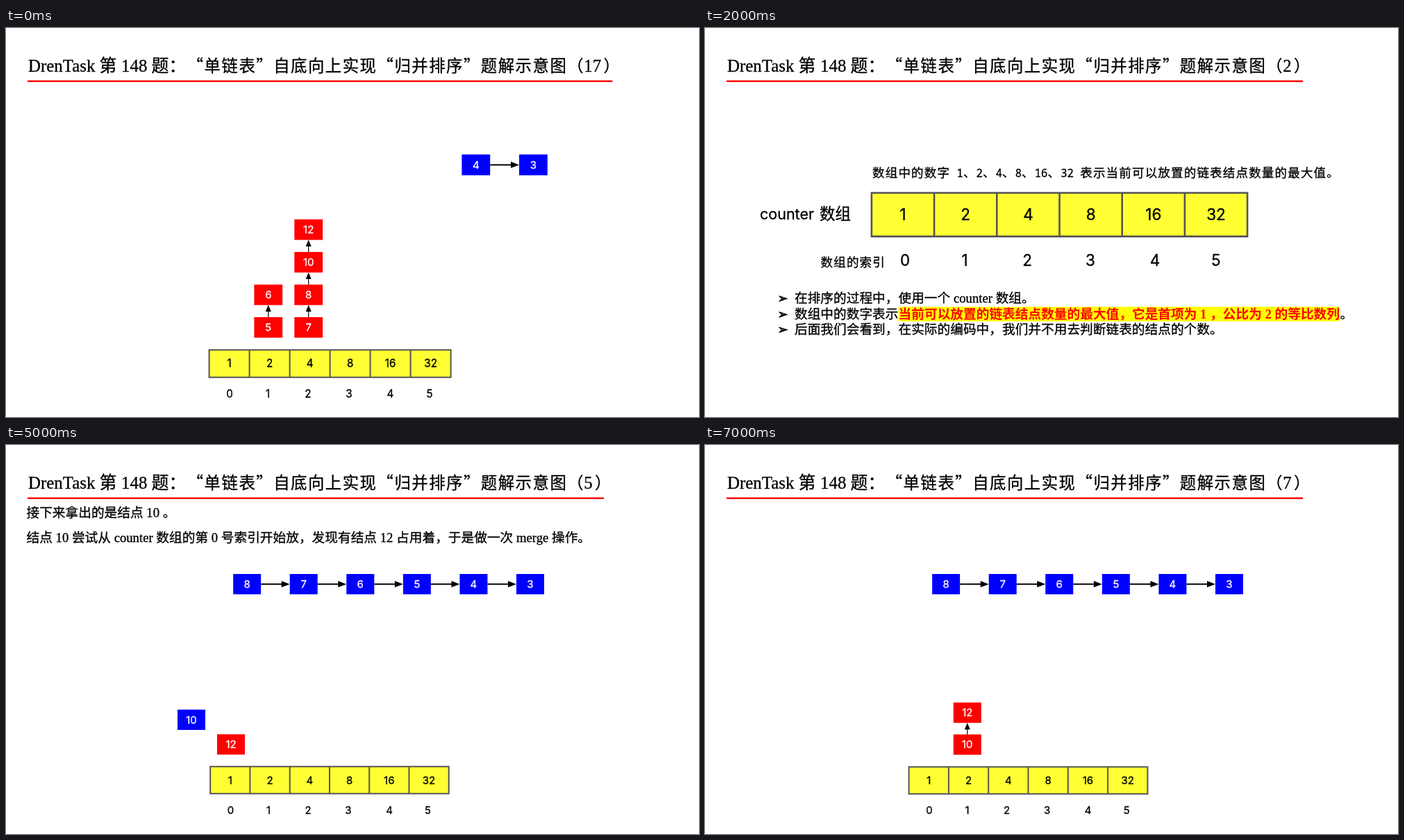
Recreate the animation shown at these times as an HTML page. Size 998 px wide and 561 px high, loop 8000 ms.

```html
<!DOCTYPE html>
<html lang="zh-CN">
<head>
<meta charset="utf-8">
<title>归并排序</title>
<style>
html, body { margin: 0; width: 100%; height: 100%; overflow: hidden; background: #fff; }
svg { display: block; width: 998px; height: 561px; }
text {
  white-space: pre;
  text-spacing-trim: space-all;
  text-autospace: no-autospace;
  font-family: "Liberation Serif", "Noto Sans CJK SC", "Noto Sans CJK JP", serif;
  stroke-width: .3px;
}
.cjk, .kai { font-family: "Noto Sans CJK SC", "Noto Sans CJK JP", sans-serif; }
.kai { letter-spacing: .064em; }
.mono { font-family: "Noto Sans Mono", monospace; letter-spacing: 0; }
.num { font-family: Inter, "Noto Sans CJK SC", sans-serif; }
.mid { text-anchor: middle; }
.heavy { font-weight: 500; }
.mark { font-weight: 700; stroke-width: 0; }
.bullet { font-family: "DejaVu Sans", sans-serif; stroke-width: .7px; }
.slide { visibility: hidden; animation: show 8s step-end infinite; }
@keyframes show {
  0% { visibility: visible; }
  12.5%, 100% { visibility: hidden; }
}
</style>
</head>
<body>
<svg id="stage" viewBox="0 0 998 561" xmlns="http://www.w3.org/2000/svg"></svg>
<script>
const BLUE = '#00f', RED = '#f00', BODY = 18.7, HEAD = 24.9;
const list = [12, 10, 8, 7, 6, 5, 4, 3];

const text = (x, y, size, str, cls = '', fill = '#000') =>
  `<text x="${x}" y="${y}" font-size="${size}" class="${cls}" fill="${fill}" stroke="${fill}">${str}</text>`;
const rect = (x, y, w, h, fill) =>
  `<rect x="${x}" y="${y}" width="${w}" height="${h}" fill="${fill}"/>`;
const body = (x, y, str) => text(x, y, BODY, str);
// slightly smaller glyphs on the full character pitch
const kai = (x, y, size, str) => text(x + size * .03, y, size * .94, str, 'kai');
const mono = str => `<tspan class="mono" font-size="15.6">${str}</tspan>`;

function title(n) {
  const end = 832.3 + String(n).length * HEAD / 2;
  return text(32, 63, HEAD, 'DrenTask') +
    text(134.5, 63, HEAD, '第', 'cjk heavy') +
    text(166, 63, HEAD, '148') +
    text(209.5, 63, HEAD, '题：', 'cjk heavy') +
    kai(260, 62.5, HEAD, '“单链表”自底向上实现“归并排序”题解示意图（') +
    text(832.3, 63, HEAD, n) +
    kai(end + 2.5, 62.5, HEAD, '）') +
    rect(31, 75.5, end - 14.8, 2.5, RED);
}

function node(x, y, val, fill, w = 40, h = 29.3, size = 15) {
  return rect(x, y, w, h, fill) +
    text(x + w / 2, y + h / 2 + size * .36, size, val, 'num mid', '#fff');
}

// arrow pointing right, or up when turned
function arrow(x, y, len, head, half, weight, turn = 0) {
  return `<g transform="translate(${x} ${y}) rotate(${turn})">` +
    `<path d="M0 0H${len - head + 1}" stroke="#000" stroke-width="${weight}"/>` +
    `<path d="M${len - head} ${-half}L${len} 0L${len - head} ${half}Z"/></g>`;
}

function chain(x, y, step, vals, o = {}) {
  const { w = 40, h = 29.3, size = 15, head = 12, half = 4.6, weight = 2, first = BLUE } = o;
  return vals.map((v, i) => {
    const left = x + i * step;
    return node(left, y, v, i ? BLUE : first, w, h, size) +
      (i < vals.length - 1 ? arrow(left + w, y + h / 2, step - w, head, half, weight) : '');
  }).join('');
}

// vals run from the bottom upwards
function stack(x, y, step, vals, w = 40, h = 29.3) {
  return vals.map((v, i) => {
    const top = y - i * step;
    return node(x, top, v, RED, w, h) +
      (i < vals.length - 1 ? arrow(x + w / 2, top, step - h, 9.5, 4, 1.2, -90) : '');
  }).join('');
}

function counter(x, y, step, h, size, labels, labelY, weight = 2) {
  let out = '', lines = '';
  for (let i = 0; i < 6; i++) {
    out += text(x + step * (i + .5), y + h / 2 + size * .36, size, 2 ** i, 'num mid') +
      text(labels[i], labelY, size, i, 'num mid');
    if (i) lines += `M${x + step * i} ${y}v${h}`;
  }
  return `<path d="M${x} ${y}h${step * 6}v${h}h${-step * 6}z${lines}" fill="#ff3" stroke="#555" stroke-width="${weight}"/>` + out;
}

const marked = (x, y, w, str) =>
  rect(x, y - 16.5, w, 21, '#ff0') + text(x, y, BODY, str, 'mark', RED);
const point = (y, str) => text(104.5, y, 18, '➢', 'bullet') + body(129, y, str);

const small = [323.5, 378, 435, 493, 552, 607.5];
const rowA = counter(294.2, 463.7, 57.25, 39, 15, small, 531.5);
const rowB = counter(293.6, 464.2, 57.3, 39, 15, small.map(x => x - .4), 532);
const rest = n => chain(164 + n * 81.57, 186, 81.57, list.slice(n));

const slides = [
  title(17) +
    chain(656.4, 182.4, 82.6, [4, 3], { w: 40.8, h: 30 }) +
    stack(357.4, 417, 47, [5, 6], 40.8, 29.6) +
    stack(415.3, 417, 47, [7, 8, 10, 12], 40.8, 29.6) +
    counter(292.6, 464.2, 58, 39.6, 15.2, [322, 377, 435, 494, 553.5, 610], 533),

  title(1) +
    text(107.5, 206, HEAD, '假设待排序的链表为：', 'cjk heavy') +
    text(357, 206, HEAD, list.join(' -&gt; ') + ' -&gt; NULL 。') +
    chain(44.2, 239.3, 120.57, list, { w: 59, h: 42, size: 22, head: 17.5, half: 6.6, weight: 2.5 }),

  title(2) +
    kai(240.5, 214.5, BODY, '数组中的数字' + mono(' ') +
      [1, 2, 4, 8, 16].map(v => mono(v) + '、').join('') + mono('32 ') +
      '表示当前可以放置的链表结点数量的最大值。') +
    text(79, 276, 21.5, 'counter', 'num') +
    text(165, 276, 22.5, '数组', 'cjk') +
    counter(239.9, 237.8, 90.2, 62.8, 22.5, [288, 374, 464, 555, 648, 736], 343, 2.6) +
    kai(166, 343.5, BODY, '数组的索引') +
    point(396, '在排序的过程中，使用一个 counter 数组。') +
    point(418.5, '数组中的数字表示') +
    marked(278.6, 418.5, 636, '当前可以放置的链表结点数量的最大值，它是首项为 1 ，公比为 2 的等比数列') +
    body(914.6, 418.5, '。') +
    point(441, '后面我们会看到，在实际的编码中，我们并不用去判断链表的结点的个数。'),

  title(3) +
    body(40.5, 109.3, '我们将链表的结点') +
    marked(190.3, 109.3, 168.3, '按顺序逐个脱离链表') +
    body(358.6, 109.3, '，放在 counter 数组合适的位置上。') +
    body(40.5, 139, '首先取出链表的第 1 个结点，放在 counter 数组的索引为 0 的位置上。当前拿出的是结点 12，') +
    body(40.5, 161.5, 'counter 数组的 0 号位置为空，直接放上去就好了。') +
    chain(164, 186, 81.57, list, { first: RED }) + rowA,

  title(4) + rest(1) + node(304, 417.2, 12, RED) + rowA,

  title(5) +
    body(29.5, 103.7, '接下来拿出的是结点 10 。') +
    body(29.5, 140, '结点 10 尝试从 counter 数组的第 0 号索引开始放，发现有结点 12 占用着，于是做一次 merge 操作。') +
    rest(2) + node(247, 381.6, 10, BLUE) + node(304, 417.2, 12, RED) + rowA,

  title(6) +
    body(29.5, 103.7, '结点 10 和结点 12 merge 以后得到的链表 10 -&gt; 12 ，结点的个数为 2 ，超过了 counter 数组的 0 号位置的最大值 1 ，') +
    body(29.5, 140, '因此把它放到 1 号位置。') +
    rest(2) + stack(304, 417.4, 46, [10, 12]) + rowA,

  title(7) + rest(2) + stack(357.8, 417.4, 46, [10, 12]) + rowB
];

document.getElementById('stage').innerHTML = slides.map((s, i) =>
  `<g class="slide" style="animation-delay:${i - 8}s">${s}</g>`).join('');
</script>
</body>
</html>
```
